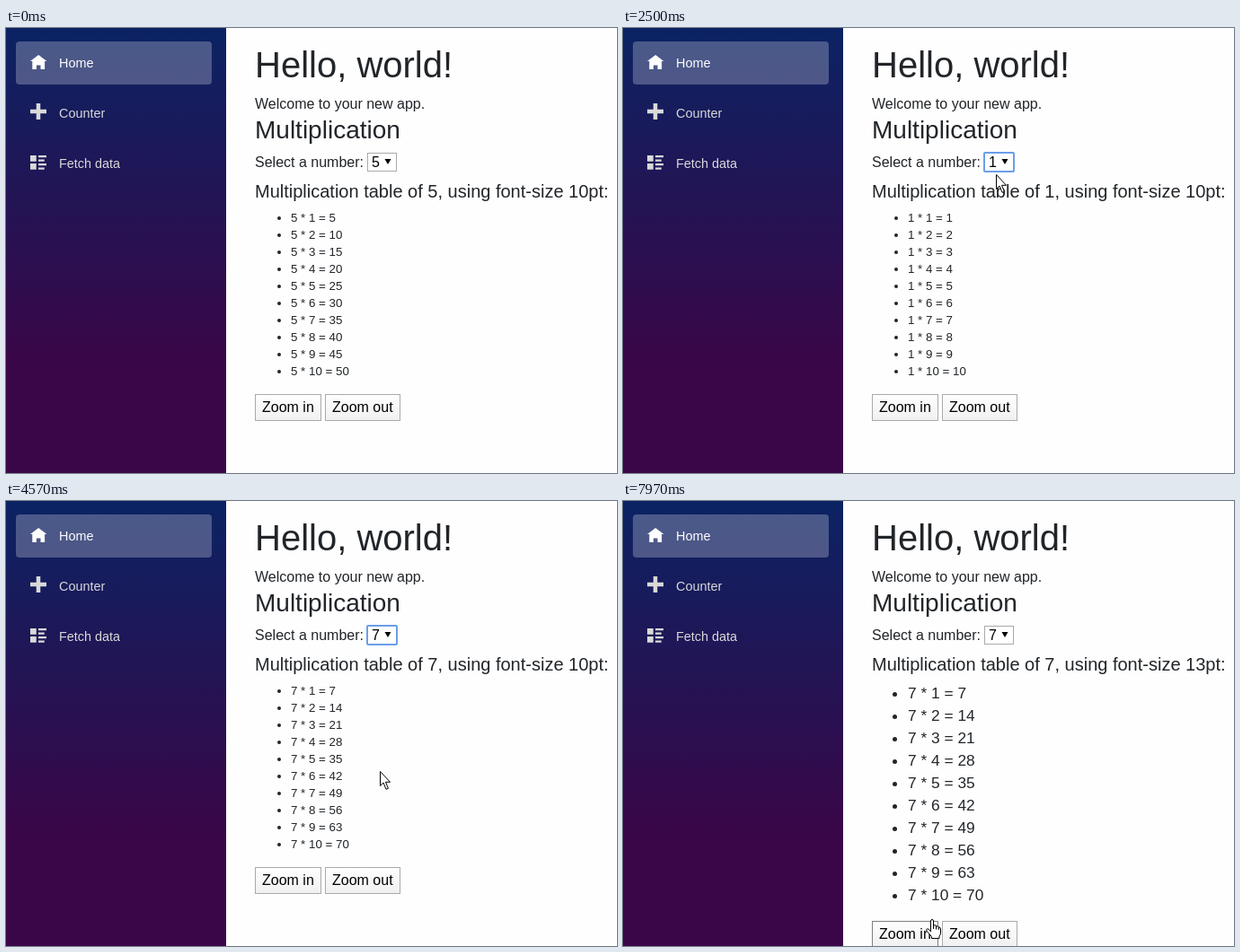
An HTML page that plays this animation: 680x496 px, repeating every 8 s.

```html
<!DOCTYPE html>
<html lang="en">
<head>
<meta charset="utf-8">
<title>Multiplication</title>
<style>
  html, body { margin: 0; width: 100%; height: 100%; overflow: hidden; background: #fefefe; }
  svg { display: block; font: 16px "Liberation Sans", Arial, sans-serif; fill: #212529; }
  .nav { font-size: 14.4px; fill: #d9d9d9; }
  .nav .active { fill: #fff; }
  .control { fill: #000; }
</style>
</head>
<body>
<svg width="680" height="496" viewBox="0 0 680 496">
  <defs>
    <linearGradient id="side" x2="0" y2="375" gradientUnits="userSpaceOnUse">
      <stop stop-color="#0b2363"/><stop offset="1" stop-color="#3a0647"/>
    </linearGradient>
    <linearGradient id="face" x2="0" y2="1">
      <stop stop-color="#fefefe"/><stop offset="1" stop-color="#f0f0f0"/>
    </linearGradient>
    <path id="arrow" d="M.5 .5V16.5L4 13L7 20.3L9.4 19.3L6.5 12.3H11.5Z" fill="#fff" stroke="#000"/>
    <g id="hand" fill="#fff" stroke="#000">
      <path d="M5.5 14V2Q5.5 .5 7 .5T8.5 2V7Q11.5 6 11.5 8Q14 7.2 14.3 9Q16.5 8.7 16.5 11V15Q16.5 17.5 15 19V21.5H6.5V19.5L1.2 13.5Q0 11.5 1.5 10.8T5.5 14Z"/>
      <path d="M8.5 6V11M11.5 8V11.5M14.3 9V12" fill="none"/>
    </g>
  </defs>
  <rect width="245" height="496" fill="url(#side)"/>
  <rect x="11" y="15" width="218" height="48" rx="4" fill="#fff" fill-opacity=".25"/>
  <g class="nav">
    <g class="active">
      <path transform="translate(27 30) scale(2.3)" d="M4 0l-4 3h1v4h2v-2h2v2h2v-4h1z"/>
      <text x="59" y="44">Home</text>
    </g>
    <path transform="translate(27 84) scale(2.25)" d="M3 0v3h-3v2h3v3h2v-3h3v-2h-3v-3z"/>
    <text x="59" y="100">Counter</text>
    <path transform="translate(27 142) scale(2.25)" d="M0 0v3h3v-3zM4 0v1h4v-1zM4 2v1h3v-1zM0 4v3h3v-3zM4 4v1h4v-1zM4 6v1h3v-1z"/>
    <text x="59" y="156">Fetch data</text>
  </g>
  <text x="277" y="55" font-size="40">Hello, world!</text>
  <text x="277" y="90">Welcome to your new app.</text>
  <text x="277" y="123" font-size="28">Multiplication</text>
  <text x="277" y="155">Select a number:</text>
  <g id="page"></g>
  <use id="cursor"/>
</svg>
<script>
const LOOP = 8000;
const page = document.getElementById('page');
const cursor = document.getElementById('cursor');

// Each entry changes some properties from the given time on.
const STATES = [
  [0, { value: 5, pt: 10, open: false, focus: false, hover: false }],
  [1500, { open: true, focus: true }],
  [2170, { open: false, value: 1 }],
  [3200, { open: true }],
  [4150, { open: false, value: 7 }],
  [5000, { hover: true }],
  [5350, { pt: 11, focus: false, hover: false }],
  [5700, { hover: true }],
  [6030, { pt: 12 }],
  [7000, { pt: 13 }],
];

// Pointer tip: time, x, y
const POINTER = [
  [0, 690, 345], [560, 690, 345], [1330, 415, 151], [1900, 415, 151], [2200, 414, 165],
  [2290, 414, 165], [2330, 414, 163], [2490, 414, 163], [2870, 427, 158], [3500, 427, 158],
  [3970, 421, 295], [4560, 421, 295], [5050, 315, 424], [5400, 315, 424], [5600, 314, 440],
  [5670, 314, 446], [6100, 314, 446], [6470, 316, 469], [6500, 316, 468], [6870, 316, 468],
  [7470, 314, 471], [7620, 314, 471], [7970, 343, 466], [LOOP, 343, 466],
];

const LINE_HEIGHT = { 10: 19, 11: 22, 12: 24, 13: 25 };
const LIST_TOP = 202;
const POPUP_TOP = 161;
const ROW = 182 / 9;

function stateAt(t) {
  return Object.assign({}, ...STATES.filter(([start]) => start <= t).map(([, change]) => change));
}

function pointerAt(t) {
  const next = POINTER.findIndex(([time]) => time > t);
  const [t0, x0, y0] = POINTER[next - 1];
  const [t1, x1, y1] = POINTER[next];
  const k = 1 - (1 - (t - t0) / (t1 - t0)) ** 2;
  return { x: Math.round(x0 + (x1 - x0) * k), y: Math.round(y0 + (y1 - y0) * k) };
}

const text = (x, y, content, attrs = '') => `<text x="${x}" y="${y}" ${attrs}>${content}</text>`;

const box = (x, y, w, h, fill, stroke) =>
  `<rect x="${x + .5}" y="${y + .5}" width="${w - 1}" height="${h - 1}" fill="${fill}" stroke="${stroke}"/>`;

const borderColor = hover => hover ? '#7f7f7f' : '#aaa';

function list({ value, pt }) {
  const size = pt * 4 / 3;
  const ascent = Math.round(size * .905);
  const descent = Math.round(size * .212);
  const line = LINE_HEIGHT[pt];
  const baseline = LIST_TOP + Math.floor((line - ascent - descent) / 2 + ascent);
  const offset = Math.floor(ascent * 2 / 3);
  const radius = Math.floor((offset + 1) / 2) / 2;
  const bulletY = baseline - ascent + Math.floor(3 * (ascent - offset) / 2) + radius;
  let out = '';
  for (let i = 0; i < 10; i++) {
    const n = i + 1;
    out += `<circle cx="${310 - offset + radius}" cy="${bulletY + i * line}" r="${radius}"/>`;
    out += text(317, baseline + i * line, `${value} * ${n} = ${value * n}`, `font-size="${size}"`);
  }
  return out;
}

function button(x, y, width, label, hover) {
  return box(x, y, width, 30, 'url(#face)', borderColor(hover)) + text(x + 8, y + 20, label, 'class="control"');
}

function select({ value, focus }, { x, y }) {
  const over = x >= 402 && x < 435 && y >= 139 && y < 160;
  const ring = '<rect x="402" y="139" width="33" height="21" rx="1" fill="none" stroke="#6c9ee8" stroke-width="2"/>';
  return box(402, 139, 33, 21, '#fff', borderColor(over)) + (focus ? ring : '') +
    text(407, 155, value, 'class="control"') +
    '<path class="control" d="M421.5 146H428.5L425 152Z"/>';
}

function popup({ value }, { y }) {
  const active = y >= POPUP_TOP ? Math.floor((y - POPUP_TOP) / ROW) + 1 : value;
  let out = box(402, 160, 33, 184, '#fff', '#7398d8');
  for (let n = 1; n <= 9; n++) {
    const top = Math.round(POPUP_TOP + (n - 1) * ROW);
    if (n === active) out += `<rect x="403" y="${top}" width="31" height="20" fill="#1e90ff"/>`;
    out += text(407, top + 14, n, `fill="${n === active ? '#fff' : '#000'}"`);
  }
  return out;
}

let shown = '';
function render(t) {
  const state = stateAt(t);
  const tip = pointerAt(t);
  const buttonTop = LIST_TOP + 10 * LINE_HEIGHT[state.pt] + 16;
  const title = `Multiplication table of ${state.value}, using font-size ${state.pt}pt:`;
  const markup = text(277, 189, title, 'font-size="20"') + list(state) +
    button(277, buttonTop, 74, 'Zoom in', state.hover) +
    button(355, buttonTop, 84, 'Zoom out', false) +
    select(state, tip) + (state.open ? popup(state, tip) : '');
  if (markup !== shown) page.innerHTML = shown = markup;

  const hand = tip.y >= 408;
  cursor.setAttribute('href', hand ? '#hand' : '#arrow');
  cursor.setAttribute('transform', `translate(${tip.x - (hand ? 6 : 0)} ${tip.y})`);
}

function tick() {
  render(performance.now() % LOOP);
  requestAnimationFrame(tick);
}
tick();
</script>
</body>
</html>
```
